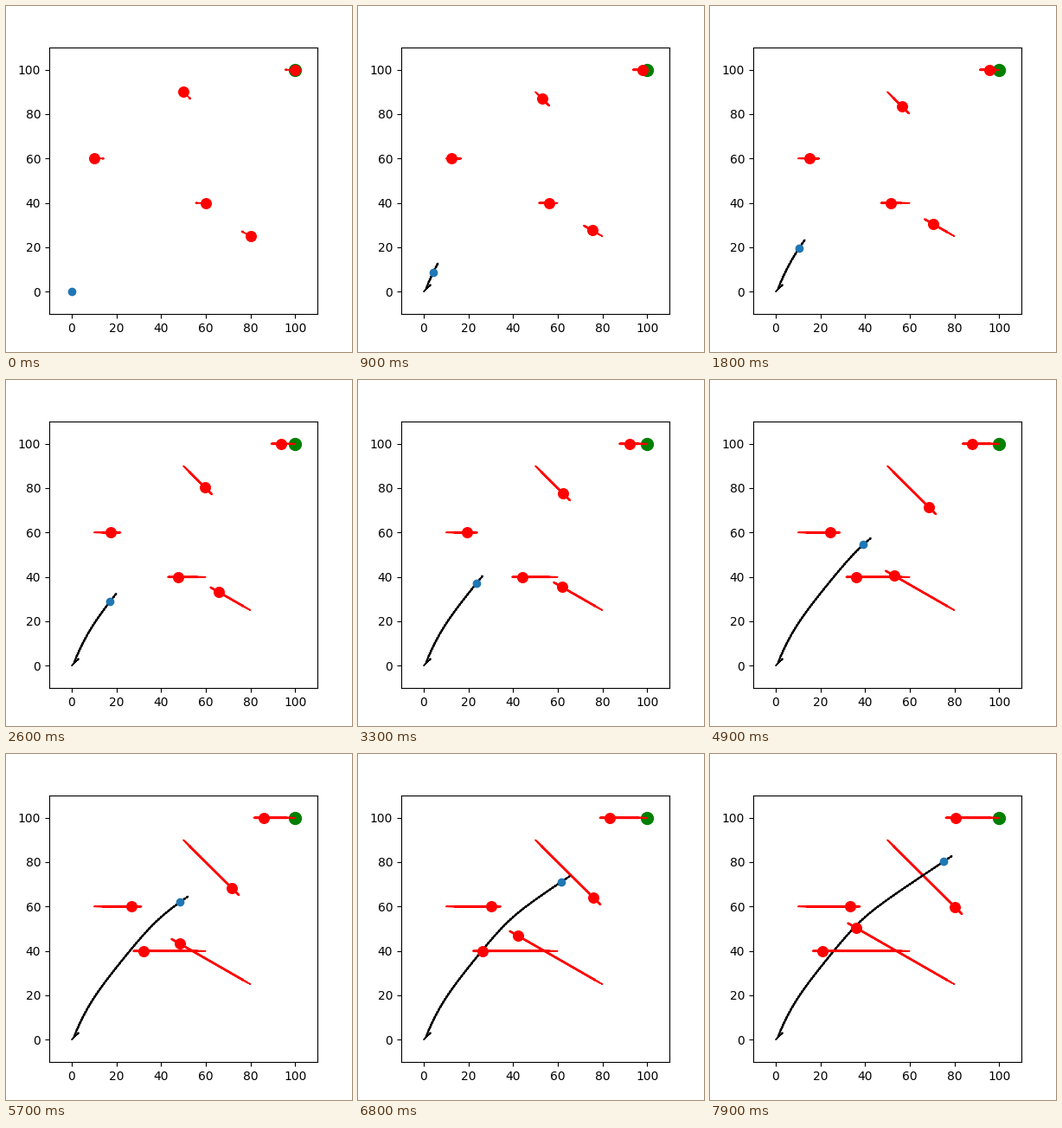
Animation, 400 px wide and 400 px high, one loop 8000 ms. Source, as a matplotlib script:

```python
import numpy as np
import matplotlib.pyplot as plt
from matplotlib.animation import FuncAnimation

FRAMES, INTERVAL = 80, 100
GOAL = (100, 100)

# x, y, heading in degrees, speed per step
MOVERS = np.array([
    (10, 60, 0, 0.30),
    (60, 40, 180, 0.50),
    (50, 90, -45, 0.55),
    (80, 25, 150, 0.65),
    (100, 100, 180, 0.25),
])
START, ANGLE, SPEED = MOVERS[:, :2], np.radians(MOVERS[:, 2]), MOVERS[:, 3]


def polar(length, angle):
    return np.stack((length * np.cos(angle), length * np.sin(angle)), axis=-1)


def ease_off(t, center, width):
    """Falls smoothly from 1 to 0 around center."""
    return 1 / (1 + np.exp((t - center) / width))


def heading(t):
    """Robot heading: 45 degrees at first, then two gentle right turns."""
    turn = 34 + 18 * ease_off(t, 13, 5) + 17 * ease_off(t, 48, 4)
    return np.radians(np.where(t < 1, 45, turn))


def speed(t):
    return 1.475 - 0.35 * np.exp(-t / 9)


steps = np.arange(FRAMES)
hops = polar(speed(steps + 0.5), heading(steps + 0.5))
robot = np.vstack(([0, 0], np.cumsum(hops, axis=0)))
yaw = heading(steps + 1.5)
yaw[0] = heading(0)

fig, ax = plt.subplots(figsize=(4, 4), dpi=100)
ax.set_xlim(-10, 110)
ax.set_ylim(-10, 110)


def step_of(n):
    return max(n - 1, 0)


def movers_at(n):
    return START + polar(SPEED, ANGLE) * step_of(n)


def add_arrow(pos, angle, color, length=4.6, head=0.75):
    arrow = ax.arrow(*pos, *polar(length, angle), color=color,
                     head_length=head, head_width=head,
                     length_includes_head=True)
    arrow.set_visible(False)
    return arrow


# every arrow stays on stage once it has appeared
trail = []
for n in range(FRAMES):
    stamps = []
    if n:
        g = step_of(n)
        stamps.append(add_arrow(robot[g], yaw[g], "black"))
    stamps += [add_arrow(p, a, "red") for p, a in zip(movers_at(n), ANGLE)]
    trail.append(stamps)

ax.scatter(*GOAL, s=100, color="green", zorder=0.9)
robot_dot = ax.scatter(0, 0, color="tab:blue", zorder=3)
mover_dots = ax.scatter(*START.T, s=70, color="red", zorder=3)


def update(n):
    for k, stamps in enumerate(trail):
        for arrow in stamps:
            arrow.set_visible(k <= n)
    robot_dot.set_offsets(robot[step_of(n)])
    mover_dots.set_offsets(movers_at(n))
    return []


anim = FuncAnimation(fig, update, frames=FRAMES, interval=INTERVAL,
                     init_func=lambda: update(0), repeat=True, repeat_delay=0)
plt.show()
```
